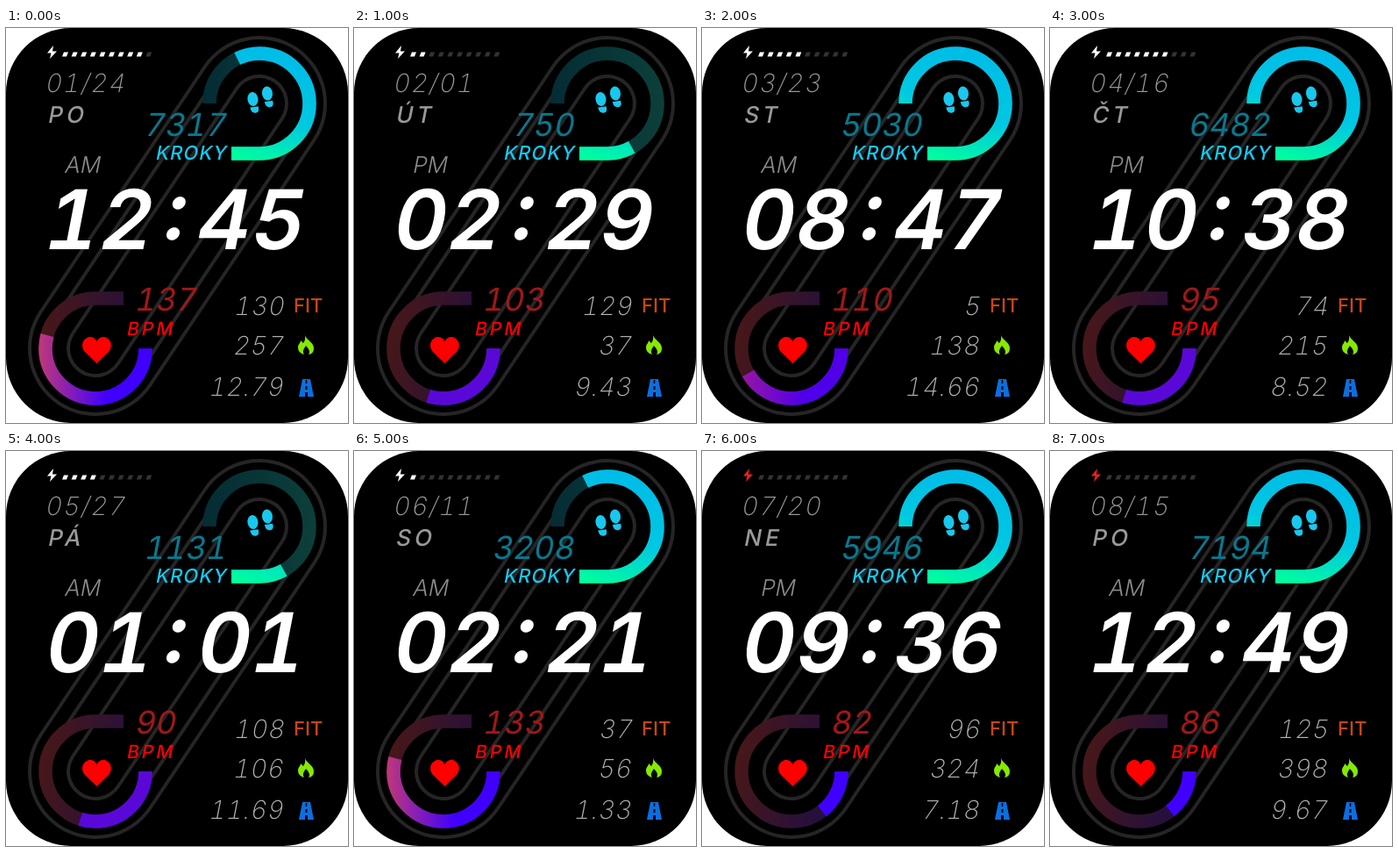
Animation, 390 px wide and 450 px high, one loop 8000 ms. Source, as an HTML page:

```html
<!DOCTYPE html>
<html lang="cs">
<head>
<meta charset="utf-8">
<style>
  html, body { margin: 0; width: 100%; height: 100%; overflow: hidden; background: #fff; }
  svg { display: block; width: 390px; height: 450px; }
  text { font-family: Inter, Roboto, sans-serif; font-variant-numeric: tabular-nums; }
  .ring { fill: none; stroke-width: 15.5; }
  .capsule { stroke-linecap: round; }
</style>
</head>
<body>
<svg id="face" viewBox="0 0 390 450">
  <defs>
    <linearGradient id="stepsLit" gradientUnits="userSpaceOnUse" x1="270" y1="151" x2="315" y2="21">
      <stop offset="0" stop-color="#00ff9c"/>
      <stop offset=".45" stop-color="#00c8e2"/>
      <stop offset="1" stop-color="#00bbe8"/>
    </linearGradient>
    <linearGradient id="stepsDim" gradientUnits="userSpaceOnUse" x1="224" y1="0" x2="354" y2="0">
      <stop offset="0" stop-color="#042c34"/>
      <stop offset="1" stop-color="#0c403a"/>
    </linearGradient>
    <linearGradient id="pulseLit" gradientUnits="userSpaceOnUse" x1="37" y1="0" x2="115" y2="0">
      <stop id="pulseTip" offset="0"/>
      <stop id="pulseBase" offset="1"/>
    </linearGradient>
    <linearGradient id="pulseDim" gradientUnits="userSpaceOnUse" x1="45" y1="340" x2="140" y2="360">
      <stop offset="0" stop-color="#46171a"/>
      <stop offset="1" stop-color="#26103c"/>
    </linearGradient>
    <path id="stepsPath" d="M257 143H289A57 57 0 1 0 232 86"/>
    <path id="pulsePath" d="M159 365A57 57 0 1 1 102 308H134"/>
  </defs>

  <rect width="390" height="450" rx="74"/>
  <g id="capsules"></g>

  <use href="#stepsPath" class="ring" stroke="url(#stepsDim)"/>
  <use href="#stepsPath" class="ring" stroke="url(#stepsLit)" id="stepsArc"/>
  <use href="#pulsePath" class="ring" stroke="url(#pulseDim)"/>
  <use href="#pulsePath" class="ring" stroke="url(#pulseLit)" id="pulseArc"/>

  <path id="bolt" d="M54 20L47 28.500H51.500L50 35L58 26.500H53Z"/>
  <g id="battery"></g>

  <g fill="#19c8ee">
    <g id="foot" transform="rotate(-8 282 85)">
      <ellipse cx="282" cy="81" rx="6" ry="8"/>
      <path d="M277.500 90H287Q288 97 283 97T277.500 90Z"/>
    </g>
    <use href="#foot" transform="translate(16.500 -6.500)"/>
  </g>
  <path fill="#f00" d="M103.500 382L90 369C83 360 90 352 96 352Q101 352 103.500 357Q106 352 111 352C117 352 124 360 117 369Z"/>
  <path fill="#86ea00" d="M341 350C343 356 351 358 351 365Q351 371 345 372Q348 368 342 362Q337 368 340 372Q333 370 333 364C333 360 336 359 336 356L339 359Q342 355 341 350Z"/>
  <path fill="#0b6fe0" fill-rule="evenodd" d="M338 400H347L351 420H334ZM341.700 401V405H343.300V401ZM341.500 408V412H343.500V408ZM341 415V420H344V415Z"/>
  <g id="labels"></g>
</svg>
<script>
const $ = id => document.getElementById(id);

function add(parent, tag, attrs) {
  const el = document.createElementNS('http://www.w3.org/2000/svg', tag);
  for (const key in attrs) el.setAttribute(key, attrs[key]);
  return $(parent).appendChild(el);
}

function label(x, y, size, weight, fill, anchor = 'start', spacing = 0, slant = -11) {
  return add('labels', 'text', {
    transform: `translate(${x} ${y}) skewX(${slant})`, fill,
    'font-size': size, 'font-weight': weight, 'text-anchor': anchor, 'letter-spacing': spacing
  });
}

// Each capsule outline is a thick gray line with a thinner black one on top.
for (const radius of [75, 57, 31]) {
  [[2, '#252525'], [-2, '#000']].forEach(([edge, stroke]) => add('capsules', 'path', {
    d: 'M289 86L102 365', class: 'capsule', stroke, 'stroke-width': 2 * (radius + edge)
  }));
}

const cells = Array.from({ length: 10 }, (_, i) =>
  add('battery', 'path', { d: `M${64 + i * 10.6} 32.500l2 -5h5l-2 5z` }));

const fields = {
  date: label(44, 73, 29, 200, '#999', 'start', 1.5),
  day: label(47, 107.5, 26, 500, '#999', 'start', 4),
  half: label(66, 165, 26, 300, '#8c8c8c'),
  steps: label(250, 123, 36, 400, '#08788e', 'end'),
  pulse: label(146, 322, 36, 400, '#a01818'),
  score: label(317, 327, 29, 200, '#b0b0b0', 'end', .5),
  energy: label(316, 372, 29, 200, '#b0b0b0', 'end', .5),
  distance: label(316, 419, 29, 200, '#b0b0b0', 'end', .5)
};
const digits = [[71, 252], [133, 252], [189, 241], [244, 252], [306, 252]].map(([x, y]) =>
  label(x, y, 94, 600, '#fff', 'middle'));
label(170, 150, 22, 500, '#14c8ee', 'start', 1).textContent = 'KROKY';
label(137, 350, 21, 500, '#f00', 'start', 3).textContent = 'BPM';
label(328, 324, 22, 500, '#c8460f', 'start', 0, 0).textContent = 'FIT';

// Arc lengths, and for the pulse also the colours at its left and right.
const stepsLevels = [61, 237, 301];
const pulseLevels = [
  [52, '#4000ff', '#4000ff'],
  [107, '#5a08d8', '#5a08d8'],
  [149, '#a0189c', '#5000e8'],
  [194, '#c03878', '#4000ff']
];

// date, day, half, time, steps, pulse, score, energy, distance, battery, steps level, pulse level
const states = [
  ['01/24', 'PO', 'AM', '12:45', 7317, 137, 130, 257, '12.79', 9, 1, 3],
  ['02/01', 'ÚT', 'PM', '02:29', 750, 103, 129, 37, '9.43', 2, 0, 1],
  ['03/23', 'ST', 'AM', '08:47', 5030, 110, 5, 138, '14.66', 5, 2, 2],
  ['04/16', 'ČT', 'PM', '10:38', 6482, 95, 74, 215, '8.52', 7, 2, 1],
  ['05/27', 'PÁ', 'AM', '01:01', 1131, 90, 108, 106, '11.69', 4, 0, 1],
  ['06/11', 'SO', 'AM', '02:21', 3208, 133, 37, 56, '1.33', 1, 1, 3],
  ['07/20', 'NE', 'PM', '09:36', 5946, 82, 96, 324, '7.18', 0, 2, 0],
  ['08/15', 'PO', 'AM', '12:49', 7194, 86, 125, 398, '9.67', 0, 2, 0]
];

function show([date, day, half, time, steps, pulse, score, energy, distance, charge, stepsLevel, pulseLevel]) {
  const values = { date, day, half, steps, pulse, score, energy, distance };
  for (const key in fields) fields[key].textContent = values[key];
  digits.forEach((digit, i) => digit.textContent = time[i]);
  cells.forEach((cell, i) => cell.setAttribute('fill', i < charge ? '#fff' : '#333'));
  $('bolt').setAttribute('fill', charge ? '#fff' : '#e82020');
  const [length, tip, base] = pulseLevels[pulseLevel];
  $('pulseTip').setAttribute('stop-color', tip);
  $('pulseBase').setAttribute('stop-color', base);
  $('pulseArc').setAttribute('stroke-dasharray', `${length} 999`);
  $('stepsArc').setAttribute('stroke-dasharray', `${stepsLevels[stepsLevel]} 999`);
}

let start, current = -1;
function tick(now) {
  start ??= now;
  const index = Math.floor((now - start) / 1000) % states.length;
  if (index !== current) show(states[current = index]);
  requestAnimationFrame(tick);
}
show(states[0]);
requestAnimationFrame(tick);
</script>
</body>
</html>
```
